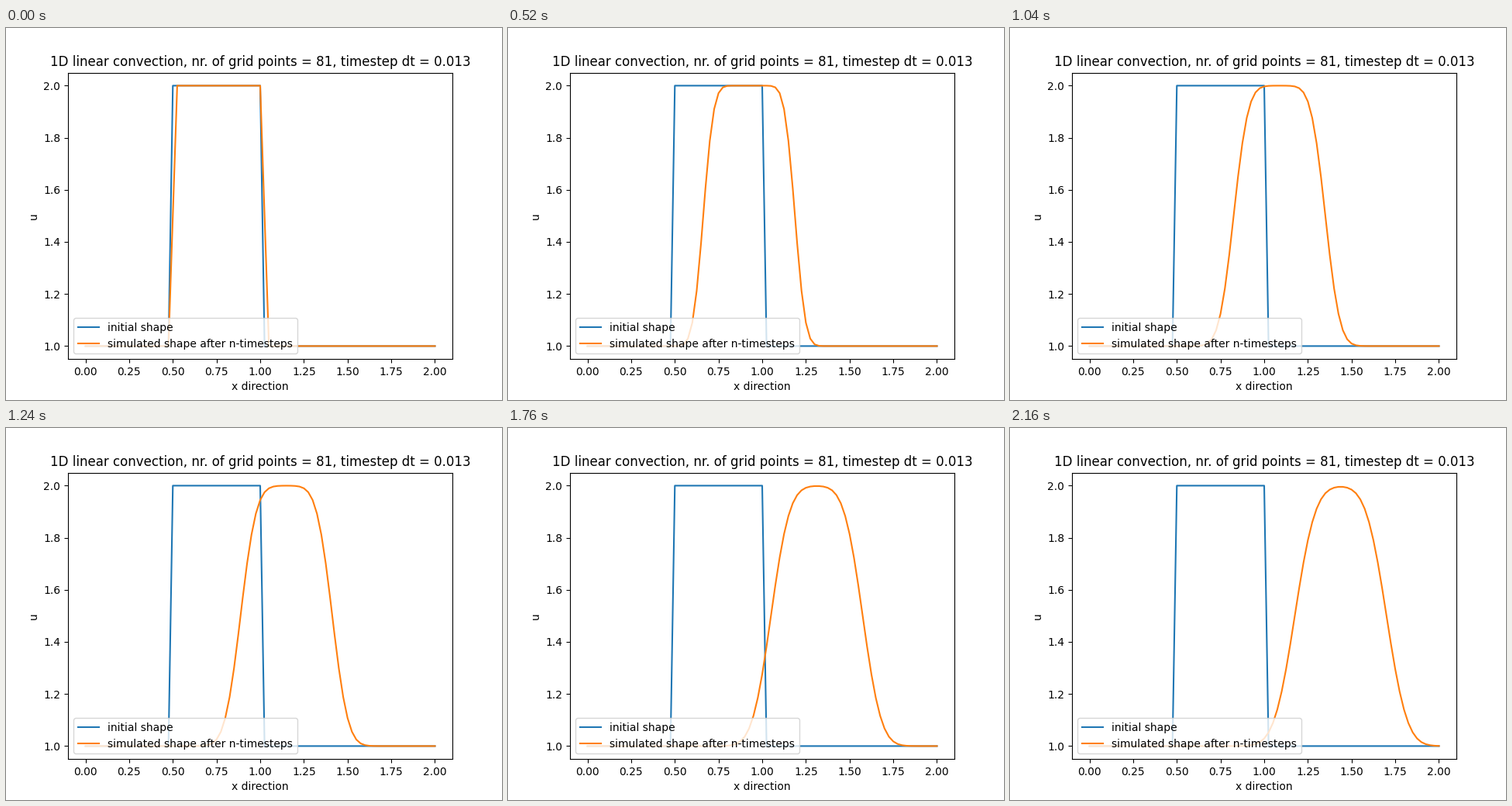
A matplotlib script for the animation above (2200 ms loop, 640x480 px).

```python
import numpy as np
import matplotlib.pyplot as plt
from matplotlib.animation import FuncAnimation

NX, LENGTH = 81, 2.0
SPEED, SIGMA = 1.0, 0.5
FRAMES, INTERVAL = 55, 40

dx = LENGTH / (NX - 1)
dt = SIGMA * dx / SPEED
x = np.linspace(0, LENGTH, NX)

u0 = np.ones(NX)
u0[int(0.5 / dx):int(1 / dx + 1)] = 2


def convect(u):
    """Advance one upwind step."""
    new = u.copy()
    new[1:] -= SPEED * dt / dx * (u[1:] - u[:-1])
    return new


states = [convect(u0)]
while len(states) < FRAMES:
    states.append(convect(states[-1]))

fig, ax = plt.subplots(figsize=(6.4, 4.8), dpi=100)
ax.plot(x, u0, label="initial shape")
wave, = ax.plot(x, states[0], label="simulated shape after n-timesteps")
ax.set_title(f"1D linear convection, nr. of grid points = {NX}, timestep dt = 0.013")
ax.set_xlabel("x direction")
ax.set_ylabel("u")
ax.legend(loc="lower left")


def update(i):
    wave.set_ydata(states[i])
    return wave,


anim = FuncAnimation(fig, update, frames=FRAMES, interval=INTERVAL, repeat=True)
plt.show()
```
